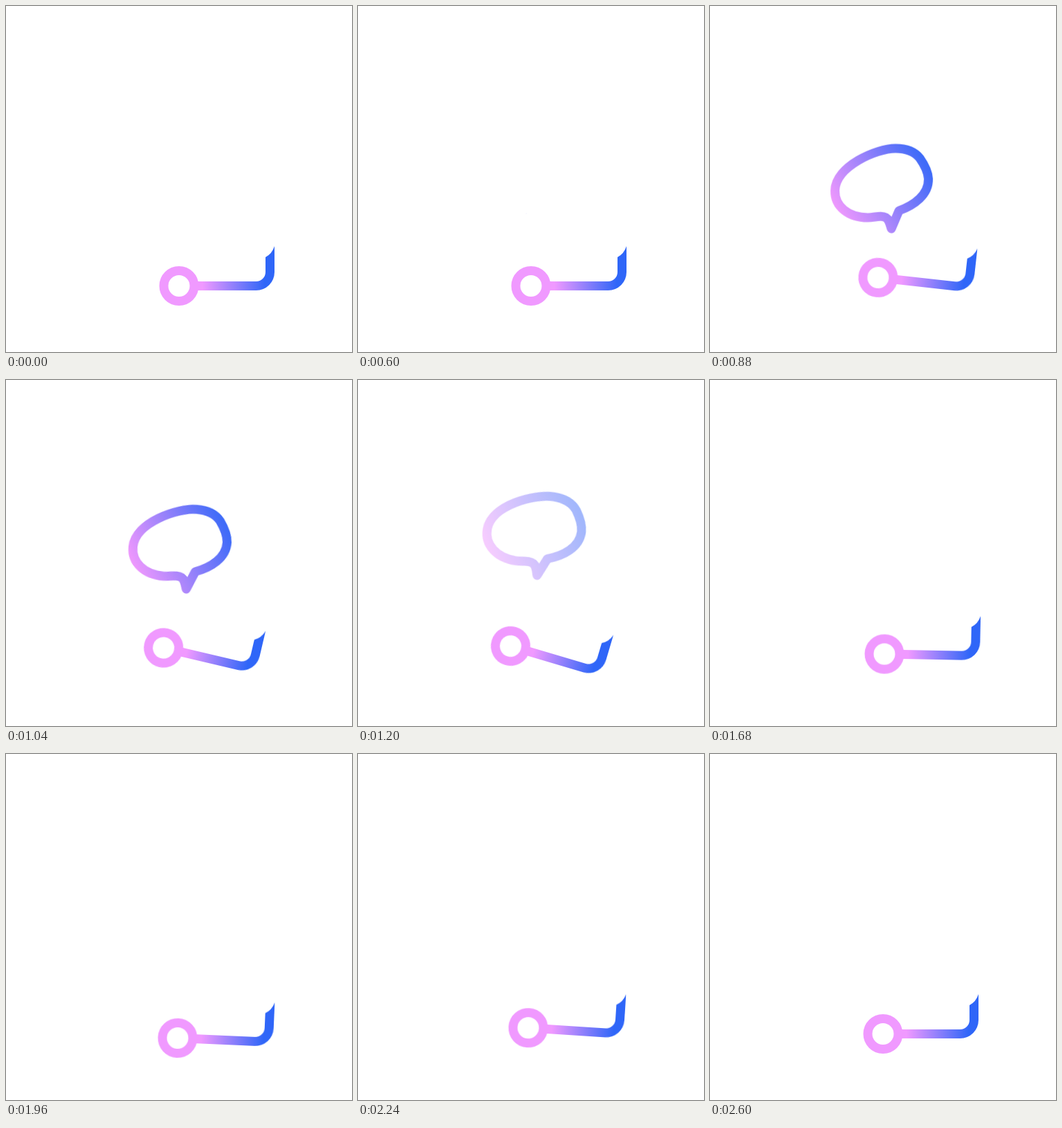
Animation of 500x500 px, one loop 3 s. Source, as an HTML page:

```html
<!DOCTYPE html>
<html lang="en">
<head>
<meta charset="utf-8">
<title>Headset talk</title>
<style>
  html, body { margin: 0; width: 100%; height: 100%; overflow: hidden; background: #fff; }
  svg { display: block; width: 100%; height: 100%; }
  .mic, .drift, .pop { animation: 3s linear infinite; }
  .mic { transform-origin: 250px 404.5px; animation-name: talk; }
  .drift, .pop { transform-origin: 248px 264px; }
  .drift { animation-name: drift; }
  .pop { animation-name: pop; }

  @keyframes talk {
    0% { transform: translate(0, 0) rotate(0deg); }
    20% { transform: translate(0, 0) rotate(0deg); animation-timing-function: cubic-bezier(.45, 0, .75, .6); }
    29.333% { transform: translate(-7px, -12px) rotate(6.3deg); animation-timing-function: cubic-bezier(.3, .35, .6, 1); }
    40% { transform: translate(-29.5px, -20px) rotate(16.5deg); animation-timing-function: ease-in-out; }
    48% { transform: translate(-10px, 6px) rotate(7deg); animation-timing-function: cubic-bezier(.45, 0, .75, .7); }
    53.333% { transform: translate(4.5px, -5px) rotate(.8deg); animation-timing-function: ease-out; }
    56% { transform: translate(2px, -8.5px) rotate(1.1deg); animation-timing-function: ease-in-out; }
    65.333% { transform: translate(-2px, 6px) rotate(2.5deg); animation-timing-function: ease-in-out; }
    74.667% { transform: translate(-4px, -8.8px) rotate(3.7deg); }
    76% { transform: translate(-5.2px, -7.8px) rotate(3.9deg); animation-timing-function: ease-in-out; }
    86.667%, 100% { transform: translate(0, 0) rotate(0deg); }
  }
  @keyframes drift {
    0%, 20% { transform: translate(-5px, 36px) rotate(-7.9deg); opacity: 1; }
    37.333% { transform: translate(4.5px, -31px) rotate(6.75deg); opacity: 1; }
    42.667% { transform: translate(7.5px, -51px) rotate(11.25deg); opacity: 0; }
    100% { transform: translate(7.5px, -51px) rotate(11.25deg); opacity: 0; }
  }
  @keyframes pop {
    0%, 20% { transform: scale(0); animation-timing-function: ease-out; }
    28%, 100% { transform: scale(1); }
  }
</style>
</head>
<body>
<svg viewBox="0 0 500 500">
  <defs>
    <linearGradient id="armFill" gradientUnits="userSpaceOnUse" x1="284" y1="0" x2="374" y2="0">
      <stop stop-color="#f099ff"/>
      <stop offset="1" stop-color="#2f66f8"/>
    </linearGradient>
    <linearGradient id="bubbleFill" gradientUnits="userSpaceOnUse" x1="186" y1="296" x2="310" y2="226">
      <stop stop-color="#ec97fd"/>
      <stop offset="1" stop-color="#3f6bf8"/>
    </linearGradient>
  </defs>
  <g class="drift">
    <path class="pop" fill="none" stroke="url(#bubbleFill)" stroke-width="13" stroke-linejoin="round"
      d="M273 296 C295 288 316 273 315.5 250 C315 240 310 230 303 220 C295 210 283 206 268 206
         C240 206 181 232 180.5 267 C180 290 200 306 228 306 C238 306 247 302 254 306
         C259 309 260 316 262 322 Z"/>
  </g>
  <g class="mic">
    <path fill="url(#armFill)"
      d="M274 398 H361.5 A13.5 13.5 0 0 0 375 384.5 V363 Q384.5 358 388 347
         V384.5 A26.5 26.5 0 0 1 361.5 411 H274 Z"/>
    <circle cx="250" cy="404.5" r="22" fill="none" stroke="#f099ff" stroke-width="13"/>
  </g>
</svg>
</body>
</html>
```
